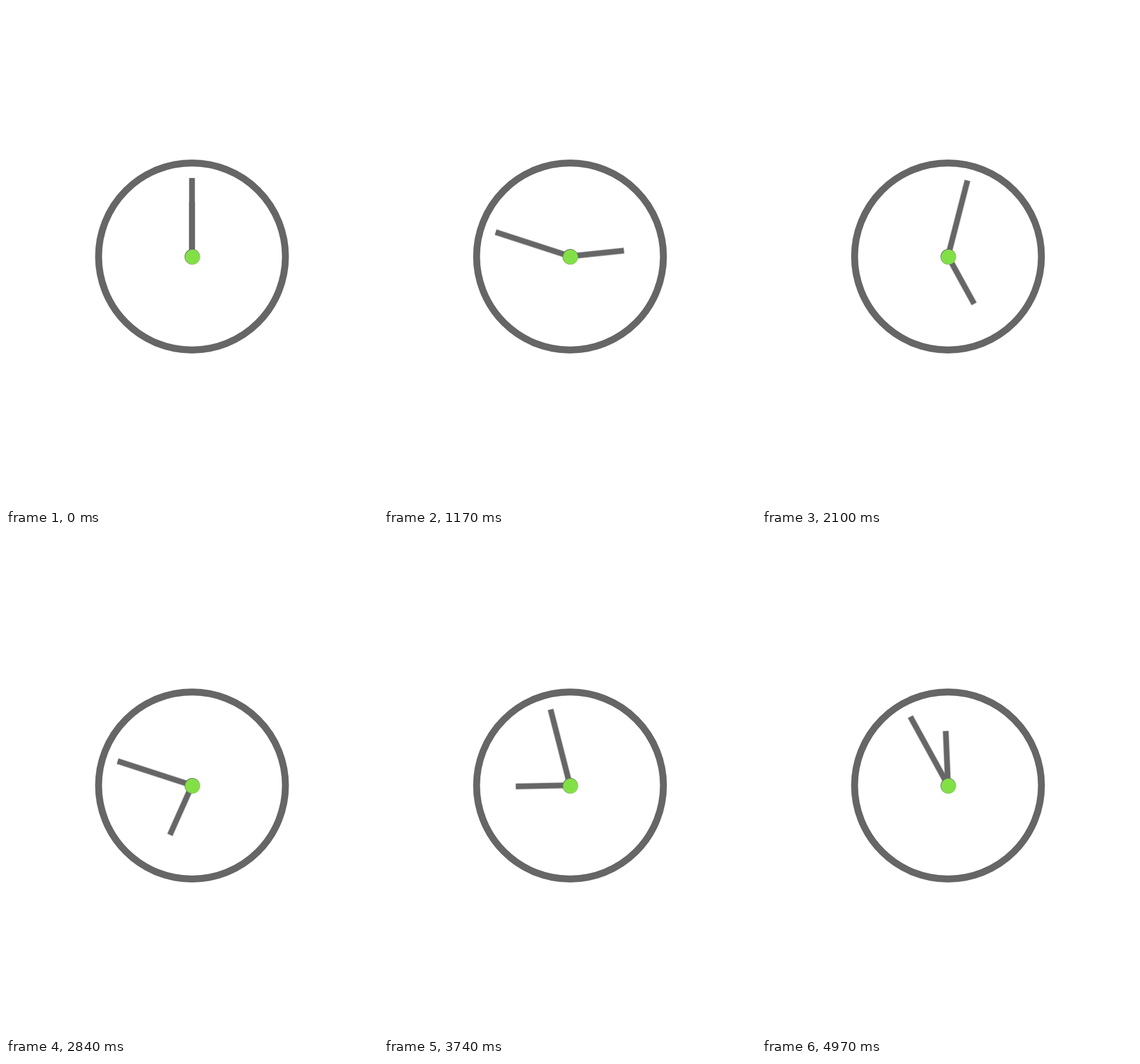
An HTML page without scripts that plays this animation: 645x868 px, repeating every 5 s.

```html
<!DOCTYPE html>
<html lang="en">
<head>
<meta charset="utf-8">
<title>Clock</title>
<style>
  html, body {
    margin: 0;
    width: 100%;
    height: 100%;
    overflow: hidden;
    background: #fff;
  }
  svg {
    display: block;
    width: 100vw;
    height: 100vh;
  }
  .line {
    fill: none;
    stroke: #666;
  }
  /* 150 ticks per loop; the small negative delay aligns ticks to 10 ms marks */
  .hand {
    stroke-width: 10;
    transform-origin: 322.5px 433.6px;
    animation: turn 5s steps(150) -3.4ms infinite;
  }
  .hour { --turn: 360deg; }
  .minute { --turn: 4320deg; }
  @keyframes turn {
    from { transform: rotate(0deg); }
    to { transform: rotate(var(--turn)); }
  }
</style>
</head>
<body>
<svg viewBox="0 0 645 868" role="img" aria-label="Clock with fast turning hands">
  <circle class="line" cx="322.5" cy="434" r="162" stroke-width="12"/>
  <path class="line hand hour" d="M322.5 433.6v-94"/>
  <path class="line hand minute" d="M322.5 433.6v-135.5"/>
  <circle cx="323" cy="434.4" r="13.4" fill="#666"/>
  <circle cx="323.4" cy="435" r="12.9" fill="#82e046"/>
</svg>
</body>
</html>
```
